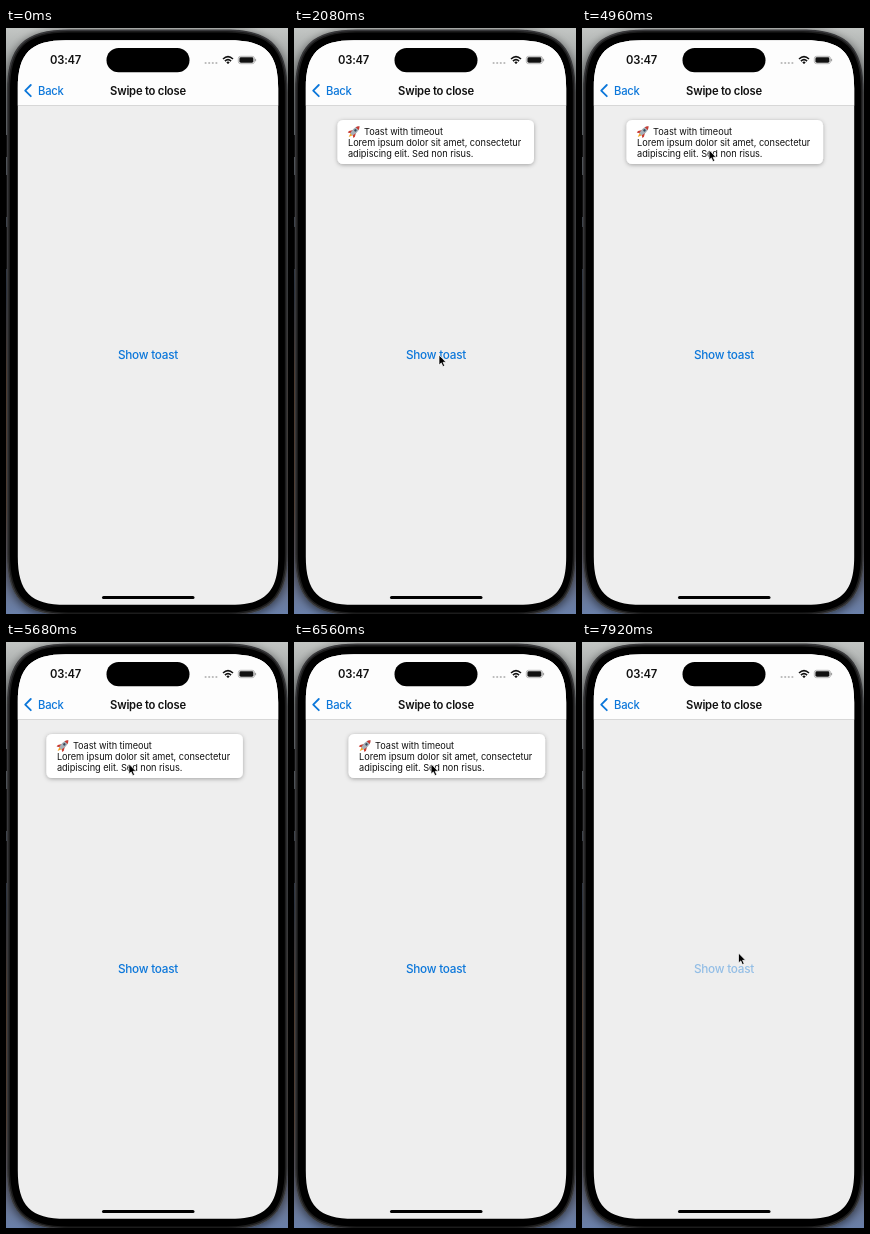
Write an HTML page that moves like this. It is 282 by 586 pixels and loops after 8000 ms.

```html
<!DOCTYPE html>
<html lang="en">
<head>
<meta charset="utf-8">
<title>Swipe to close</title>
<style>
  html, body { margin: 0; width: 100%; height: 100%; overflow: hidden; }
  svg { display: block; width: 100vw; height: 100vh; }
  text { font-family: Inter, "Liberation Sans", sans-serif; letter-spacing: -0.02em; }
  .bar { font-size: 11.25px; }
  .bold { font-weight: 600; fill: #111; }
  .link { font-weight: 450; fill: #0c77da; }
  .toast text { font-size: 9.2px; letter-spacing: -0.005em; fill: #111; }
</style>
</head>
<body>
<svg viewBox="0 0 282 586" preserveAspectRatio="none">
  <defs>
    <linearGradient id="wall" x2="0" y2="1">
      <stop offset="0" stop-color="#c3c6c4"/>
      <stop offset=".12" stop-color="#85898a"/>
      <stop offset=".45" stop-color="#3a4454"/>
      <stop offset=".6" stop-color="#69503f"/>
      <stop offset=".82" stop-color="#6b5547"/>
      <stop offset="1" stop-color="#6a80aa"/>
    </linearGradient>
    <clipPath id="screen"><path id="screenShape"/></clipPath>
    <filter id="shadow" x="-10%" y="-30%" width="120%" height="170%">
      <feDropShadow dx="0" dy="1" stdDeviation="2" flood-opacity=".32"/>
    </filter>
    <filter id="deviceShadow">
      <feDropShadow dx="0" dy="2" stdDeviation="5" flood-opacity=".6"/>
    </filter>
  </defs>

  <rect width="282" height="586" fill="url(#wall)"/>
  <path d="M.8 107v22M.8 147v42M.8 199v42" stroke="#161616" stroke-width="1.6"/>
  <path id="rim" fill="#38393a" filter="url(#deviceShadow)"/>
  <path id="bezel" stroke="#1c1c1c" stroke-width="1.5"/>

  <g clip-path="url(#screen)">
    <rect width="282" height="586" fill="#eee"/>
    <rect width="282" height="77" fill="#fdfdfd"/>
    <rect y="77" width="282" height=".8" fill="#d2d2d2"/>

    <text class="bar bold" x="44" y="36">03:47</text>
    <path d="M199.6 35h11" stroke="#b9b9b9" stroke-width="2.2" stroke-linecap="round" stroke-dasharray="0 3.6"/>
    <path d="M217 31q5-4.6 10 0M218.9 33.1q3.1-2.8 6.2 0" fill="none" stroke="#111" stroke-width="1.6"/>
    <path d="M222 36.2l-1.7-1.9q1.7-1.4 3.4 0z" fill="#111"/>
    <rect x="232.3" y="28.3" width="16.2" height="7.4" rx="2.3" fill="#fdfdfd" stroke="#999" stroke-width=".7"/>
    <rect x="233.4" y="29.3" width="14" height="5.4" rx="1.4" fill="#111"/>
    <path d="M249.6 30.8v2.5" stroke="#999"/>

    <path d="M24.8 57l-5.6 5.6 5.6 5.6" fill="none" stroke="#0c77da" stroke-width="1.8" stroke-linecap="round" stroke-linejoin="round"/>
    <text class="bar link" x="32" y="66.7">Back</text>
    <text class="bar bold" x="142" y="66.7" text-anchor="middle">Swipe to close</text>
    <text id="button" class="link" x="142" y="331.3" font-size="11.75" text-anchor="middle">Show toast</text>

    <g id="toast" class="toast">
      <rect x="43.5" y="92" width="196.5" height="44" rx="5.5" fill="#fff" filter="url(#shadow)"/>
      <g transform="translate(60.5 103.3) rotate(45)">
        <path d="M-1.5 4L0 8.2 1.5 4z" fill="#f5a623"/>
        <path d="M-2 0l-2.2 3.6.2 2L-1.4 4h2.8L4 5.6l.2-2L2 0z" fill="#c93a32"/>
        <path d="M0-7q2.7 2.6 2.5 6.5L1.6 4.5h-3.2L-2.5-.5Q-2.7-4.4 0-7z" fill="#a7b0b8"/>
        <path d="M0-7q1.5 1.4 2.1 3.2h-4.2Q-1.5-5.6 0-7z" fill="#c93a32"/>
        <circle cy="-1.3" r="1.2" fill="#33485c"/>
      </g>
      <text x="70" y="106.6">Toast with timeout</text>
      <text x="54" y="117.7">Lorem ipsum dolor sit amet, consectetur</text>
      <text x="54" y="128.8">adipiscing elit. Sed non risus.</text>
    </g>

    <rect x="100.5" y="20" width="83" height="24.3" rx="12.1"/>
    <rect x="96" y="568" width="92.5" height="3" rx="1.5"/>
  </g>

  <path id="cursor" d="M0 0v10l2.3-2.1 1.6 3.7 1.8-.8-1.6-3.5h3z" stroke="#fff" stroke-width=".7" stroke-linejoin="round"/>
</svg>
<script>
  const LOOP = 8000;
  const DRAG = { start: 4260, release: 6650, period: 1364, reach: 12 };
  const OFFSCREEN = { x: 290, y: 440 };
  const BUTTON = { x: 145, y: 327 };
  const TOAST = { x: 155, y: 122.3 };
  const GRIP = { x: 126, y: 122 };
  const NEXT_TAP = { x: 156.5, y: 311 };

  const byId = id => document.getElementById(id);
  const clamp = (v, min, max) => Math.min(max, Math.max(min, v));
  const mix = (a, b, p) => a + (b - a) * p;
  const mixPoint = (a, b, p) => ({ x: mix(a.x, b.x, p), y: mix(a.y, b.y, p) });
  const ramp = (t, start, length) => {
    const p = clamp((t - start) / length, 0, 1);
    return p * p * (3 - 2 * p);
  };

  // Rounded rectangle with continuous-curvature corners of nominal radius r.
  function squircle(x, y, w, h, r) {
    const a = 1.3 * r, k = a - .348 * r;
    return `M${x + a} ${y}h${w - 2 * a}c${k} 0 ${a} ${a - k} ${a} ${a}v${h - 2 * a}` +
      `c0 ${k} ${k - a} ${a} ${-a} ${a}h${2 * a - w}c${-k} 0 ${-a} ${k - a} ${-a} ${-a}` +
      `v${2 * a - h}c0 ${-k} ${a - k} ${-a} ${a} ${-a}z`;
  }

  function toastAt(t) {
    const held = clamp(t, DRAG.start, DRAG.release) - DRAG.start;
    const wobble = -DRAG.reach * Math.sin(2 * Math.PI * held / DRAG.period);
    return {
      x: wobble + 240 * ramp(t, DRAG.release, 450),
      y: -145 * (1 - ramp(t, 1600, 400))
    };
  }

  function cursorAt(t, toast) {
    let point = mixPoint(OFFSCREEN, BUTTON, ramp(t, 880, 480));
    point = mixPoint(point, TOAST, ramp(t, 2320, 720));
    point = mixPoint(point, GRIP, ramp(t, 3760, 400));
    point.x += Math.min(toast.x, 110);
    return mixPoint(point, NEXT_TAP, ramp(t, 7080, 680));
  }

  const press = (t, start) => ramp(t, start, 70) - ramp(t, start + 140, 180);
  const place = (id, { x, y }) => byId(id).setAttribute("transform", `translate(${x} ${y})`);

  function draw() {
    const t = performance.now() % LOOP;
    const toast = toastAt(t);
    place("toast", toast);
    place("cursor", cursorAt(t, toast));
    byId("button").setAttribute("opacity", 1 - .6 * (press(t, 1480) + press(t, 7820)));
    requestAnimationFrame(draw);
  }

  byId("rim").setAttribute("d", squircle(1, 1.5, 280.8, 586, 48));
  byId("bezel").setAttribute("d", squircle(3.2, 3.7, 276.4, 581.6, 46));
  byId("screenShape").setAttribute("d", squircle(11.8, 12.2, 260.4, 564.6, 37));
  draw();
</script>
</body>
</html>
```
